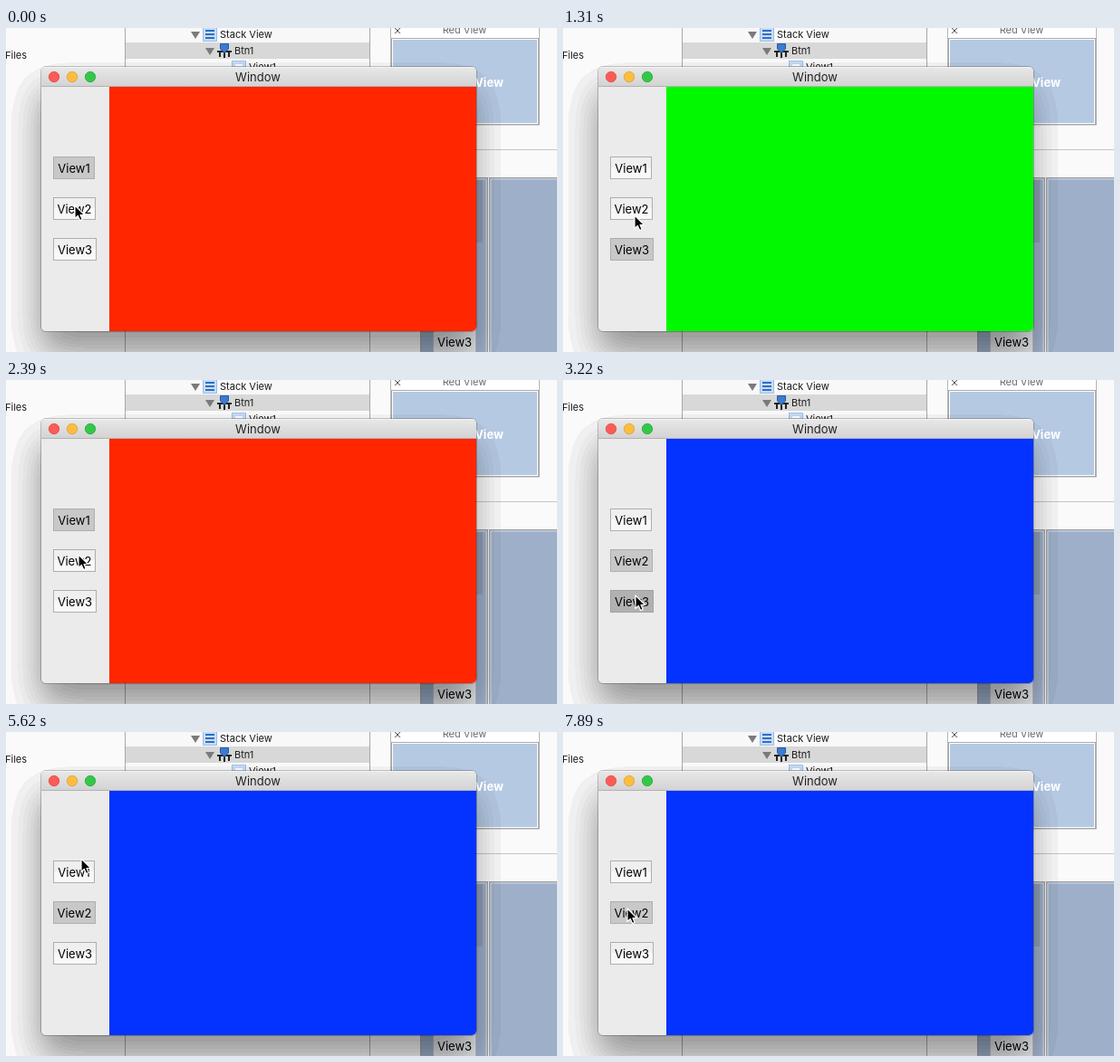
An HTML page for the animation above (7990 ms loop, 608 by 358 pixels).

```html
<!DOCTYPE html>
<html lang="en">
<head>
<meta charset="utf-8">
<title>Window</title>
<style>
html, body { margin: 0; width: 100%; height: 100%; overflow: hidden; background: #fafafa; }
svg { display: block; width: 608px; height: 358px; }
text { font-family: Inter, Roboto, sans-serif; font-size: 13px; fill: #000; }
.small { font-size: 11px; fill: #1c1c1c; }
.mid { text-anchor: middle; }
.btn rect { stroke: #aeaeae; fill: url(#idle); }
.btn.on rect { fill: #c8c8c8; }
.btn.down rect { fill: #b1b1b1; stroke: #a2a2a2; }
</style>
</head>
<body>
<svg viewBox="0 0 608 358">
  <defs>
    <linearGradient id="bar" x2="0" y2="1">
      <stop stop-color="#e8e8e8"/><stop offset="1" stop-color="#d2d2d2"/>
    </linearGradient>
    <linearGradient id="idle" x2="0" y2="1">
      <stop offset=".5" stop-color="#efefef"/><stop offset=".5" stop-color="#f8f8f8"/>
    </linearGradient>
    <clipPath id="frame"><rect x="39" y="43" width="480" height="292" rx="5"/></clipPath>
    <filter id="banded" filterUnits="userSpaceOnUse" x="-60" y="-40" width="720" height="500">
      <feGaussianBlur stdDeviation="20"/>
      <feComponentTransfer><feFuncA id="bands" type="discrete"/></feComponentTransfer>
    </filter>
  </defs>

  <rect width="608" height="358" fill="#fafafa"/>
  <text class="small" x="-1" y="34">Files</text>

  <!-- outline panel -->
  <rect x="132" width="269" height="358" fill="#f8f8f8"/>
  <rect x="132" y="16" width="269" height="18" fill="#d8d8d8"/>
  <path d="M131.5 0V358M401.5 0V358" stroke="#a8a8a8"/>
  <path d="M204 4h10l-5 8zM220 22h10l-5 8z" fill="#7a7a7a"/>
  <g fill="#c8dcf5" stroke="#9dbde6">
    <rect x="217.5" y="-.5" width="15" height="15"/>
    <rect x="249.5" y="36.5" width="15" height="15"/>
  </g>
  <path d="M220 3h10M220 7h10M220 11h10" stroke="#2f6fc4" stroke-width="2"/>
  <path d="M253 41h8" stroke="#fff" stroke-width="2"/>
  <path d="M233 25h16v2h-16zM235 27h2v5h-2zM240 27h2v6h-2zM245 27h2v5h-2z" fill="#222"/>
  <path d="M236.500 17.500h9v5.500l-4.500 4.500-4.500-4.500z" fill="#3b7bd0" stroke="#2559a0"/>
  <text class="small" x="236" y="11">Stack View</text>
  <text class="small" x="252" y="29">Btn1</text>
  <text class="small" x="268" y="47">View1</text>

  <!-- canvas panel -->
  <rect x="424.5" y="-5" width="164" height="112" fill="#fff" stroke="#b4b4b4"/>
  <rect x="425.5" y="11.5" width="162" height="95" fill="#fff" stroke="#a5a8ad"/>
  <rect x="427" y="13" width="159" height="92" fill="#b5c9e3"/>
  <path d="M429 0l6 6m0-6l-6 6" stroke="#555"/>
  <text class="small mid" x="506" y="6" style="fill:#6a6a6a">Red View</text>
  <path d="M402 134.500H608" stroke="#c6c6c6"/>
  <g fill="#9dafc9" stroke="#a0a0a0">
    <rect x="457.5" y="165.5" width="74" height="200"/>
    <rect x="533.5" y="165.5" width="90" height="200"/>
  </g>
  <path d="M459 167H530V358M608 167H535V358" fill="none" stroke="#d4d9e0"/>
  <rect x="519" y="168" width="7" height="69" fill="#8f9db4"/>
  <rect x="471.5" y="320.5" width="47" height="50" fill="#e4e6e9" stroke="#b8bcc2"/>

  <rect x="36" y="68" width="480" height="292" filter="url(#banded)"/>
  <text class="mid" x="495" y="352">View3</text>
  <text x="549" y="65" text-anchor="end" style="fill:#fff;font-weight:700">Red View</text>

  <!-- window -->
  <rect x="38.5" y="42.5" width="481" height="293" rx="5.5" fill="none" stroke="#000" stroke-opacity=".22"/>
  <g clip-path="url(#frame)">
    <rect x="39" y="43" width="480" height="292" fill="#ebebeb"/>
    <rect x="39" y="43" width="480" height="22" fill="url(#bar)"/>
    <path d="M39 43.500H519" stroke="#f4f4f4"/>
    <path d="M39 64.500H519" stroke="#b3b3b3"/>
    <rect id="view" x="114" y="65" width="405" height="270"/>
  </g>
  <g stroke-width=".8">
    <circle cx="53" cy="54" r="5.7" fill="#fc5b57" stroke="#df4744"/>
    <circle cx="73" cy="54" r="5.7" fill="#fdbd3e" stroke="#de9f34"/>
    <circle cx="93" cy="54" r="5.7" fill="#33c748" stroke="#27a935"/>
  </g>
  <text class="mid" x="278" y="59" style="fill:#222">Window</text>
  <g id="buttons"></g>
  <path id="cursor" d="M0 0V14.500L3.300 11.500 5.600 16.600 8.200 15.500 6 10.500H10.500Z" stroke="#fff" stroke-width="1.2" stroke-linejoin="round"/>
</svg>
<script>
const $ = id => document.getElementById(id);
const NS = "http://www.w3.org/2000/svg";

function add(parent, tag, attrs) {
  const el = document.createElementNS(NS, tag);
  for (const k in attrs) el.setAttribute(k, attrs[k]);
  return parent.appendChild(el);
}

// The soft shadow falls into even bands of grey
const BANDS = 16, DARK = .42;
$("bands").setAttribute("tableValues",
  Array.from({ length: BANDS }, (_, k) => k && DARK * (k + .5) / BANDS).join(" "));

const buttons = [0, 1, 2].map(i => {
  const w = 46 + i, y = 142 + 45 * i;
  const g = add($("buttons"), "g", { class: "btn" });
  add(g, "rect", { x: 52.5, y: y + .5, width: w - 1, height: 24 });
  add(g, "text", { x: 52 + w / 2, y: y + 18, class: "mid" }).textContent = "View" + (i + 1);
  return g;
});

const LOOP = 7990, STEPS = 67, TRAVEL = 4;
const COLORS = ["#ff2600", "#0433ff", "#00f900"];

// Where the pointer is at a step, and the button it presses there
const stop = (at, x, y, press = -1) => ({ at, x, y, press });
const STOPS = [
  stop(1, 76, 196, 1), stop(8, 79, 241, 2), stop(13, 79, 196, 1),
  stop(17, 80, 151, 0), stop(21, 80, 198, 1), stop(25, 80, 238),
  stop(27, 80, 238, 2), stop(31, 83, 203, 1), stop(35, 79, 170),
  stop(42, 98, 219), stop(45, 88, 162), stop(47, 83, 140),
  stop(52, 83, 140), stop(54, 83, 155), stop(56, 83, 155, 0),
  stop(64, 71, 195, 1)
];

const easeOut = p => p * (2 - p);

// Rest at a stop, one step longer after a press, then glide to the next
function pointerAt(n) {
  const i = STOPS.findLastIndex(s => s.at <= n);
  const from = STOPS[Math.max(i, 0)], to = STOPS[i + 1] || from;
  const leave = Math.max(from.at + (from.press >= 0), to.at - TRAVEL);
  const p = n > leave ? easeOut(Math.min(1, (n - leave) / (to.at - leave))) : 0;
  return ["x", "y"].map(k => Math.round(from[k] + (to[k] - from[k]) * p));
}

// The view swaps on the step after the press
function show(n) {
  let view = 0, down = -1;
  for (const s of STOPS) {
    if (s.press < 0) continue;
    if (n === s.at) down = s.press;
    if (n > s.at) view = s.press;
  }
  $("view").setAttribute("fill", COLORS[view]);
  buttons.forEach((g, i) =>
    g.setAttribute("class", "btn" + (i === down ? " down" : i === view ? " on" : "")));
  $("cursor").setAttribute("transform", `translate(${pointerAt(n)})`);
}

// Steps last 120 ms, three of them 10 ms less
const startOf = n => n * 120 - 10 * ((n >= 5) + (n >= 23) + (n >= 59));

function stepAt(t) {
  let n = STEPS - 1;
  while (n > 0 && startOf(n) > t) n--;
  return n;
}

const begin = performance.now();
function tick() {
  show(stepAt((performance.now() - begin) % LOOP));
  requestAnimationFrame(tick);
}
tick();
</script>
</body>
</html>
```
